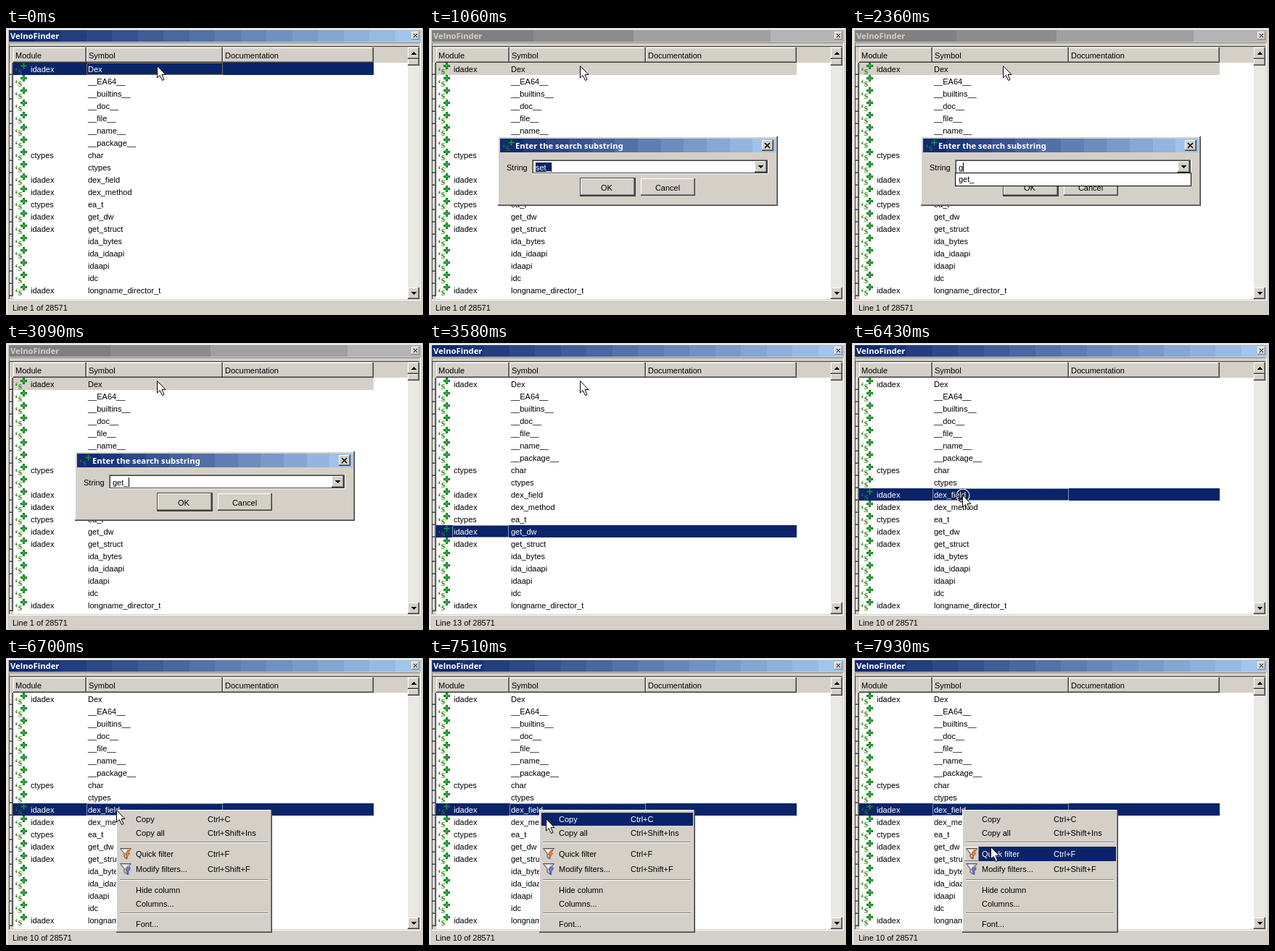
Animation, 575 px wide and 397 px high, one loop 7.99 s. Source, as an HTML page:

```html
<!DOCTYPE html>
<html lang="en">
<head>
<meta charset="utf-8">
<style>
  html, body { margin: 0; width: 100%; height: 100%; overflow: hidden; background: #d4d0c8; }
  svg { display: block; width: 575px; height: 397px; shape-rendering: crispEdges; }
  text { font: 11px "Liberation Sans", Arial, sans-serif; white-space: pre; }
  .title { font: bold 11.25px "Noto Sans", sans-serif; }
  .quote { font: bold 14px "Liberation Serif", serif; }
  .ring { fill: none; stroke: #fff; stroke-width: 1.3; mix-blend-mode: difference; }
  .smooth { shape-rendering: auto; }
</style>
</head>
<body>
<svg id="stage" viewBox="0 0 575 397"></svg>
<script>
const LOOP = 7990, STEP = 60;
const FACE = '#d4d0c8', NAVY = '#0a246a', SHADOW = '#808080', DARK = '#404040';
const ROW_TOP = 49, ROW_H = 17;
const stage = document.getElementById('stage');

const ROWS = [
  'idadex Dex', ' __EA64__', ' __builtins__', ' __doc__', ' __file__', ' __name__', ' __package__',
  'ctypes char', ' ctypes', 'idadex dex_field', 'idadex dex_method', 'ctypes ea_t', 'idadex get_dw',
  'idadex get_struct', ' ida_bytes', ' ida_idaapi', ' idaapi', ' idc', 'idadex longname_director_t',
].map(row => row.split(' '));

// label, shortcut, baseline, highlight left, top, height
const MENU = [
  ['Copy', 'Ctrl+C', 227, 155, 214, 18],
  ['Copy all', 'Ctrl+Shift+Ins', 246, 155, 233, 18],
  ['Quick filter', 'Ctrl+F', 275, 175, 261, 20],
  ['Modify filters...', 'Ctrl+Shift+F', 296, 175, 282, 20],
  ['Hide column', '', 325], ['Columns...', '', 344], ['Font...', '', 372],
];

const rect = (x, y, w, h, fill, extra = '') =>
  `<rect x="${x}" y="${y}" width="${w}" height="${h}" fill="${fill}" ${extra}/>`;
const path = (d, fill, extra = '') => `<path d="${d}" fill="${fill}" ${extra}/>`;
const text = (x, y, str, fill = '#000', extra = '') =>
  `<text x="${x}" y="${y}" fill="${fill}" ${extra}>${str}</text>`;

function bevel(x, y, w, h, light = '#fff', dark = SHADOW, fill = FACE) {
  return rect(x, y, w, h, dark) + rect(x, y, w - 1, h - 1, light) + rect(x + 1, y + 1, w - 2, h - 2, fill);
}
const button = (x, y, w, h) => rect(x, y, w, h, DARK) + bevel(x, y, w - 1, h - 1);
const arrow = (x, y, dir) => path(`M${x - 4} ${y}h8l-4 ${4 * dir}z`, '#000');

function bands(x, y, w, h, count) {
  const from = [10, 36, 106], to = [166, 202, 240];
  let out = '';
  for (let i = 0; i < count; i++) {
    const rgb = from.map((c, k) => Math.round(c + (to[k] - c) * (i + 0.5) / count));
    const left = Math.round(x + w * i / count);
    out += rect(left, y, x + w - left, h, `rgb(${rgb})`);
  }
  return out;
}

function symbolIcon(x, y, dimmed) {
  return `<g transform="translate(${x} ${y})" opacity="${dimmed ? 0.6 : 1}">` +
    text(0, 16, '‘s', '#3c8c1e', 'class="quote"') +
    path('M11 0h3v3h3v3h-3v3h-3v-3h-3v-3h3z', '#0a6e14') +
    path('M12 1h1v3h3v1h-3v3h-1v-3h-3v-1h3z', '#32d24b') + '</g>';
}

function funnel(y, badge) {
  return `<g class="smooth" transform="translate(157 ${y})">` +
    path('M.5 .5h15l-5.5 7v7.5l-4-2.5v-5z', '#c4c4c4', 'stroke="#505050"') +
    path('M3 2h8l-4 5z', '#f2f2f2') + badge + '</g>';
}

function mainTitle(active) {
  const grays = [[4, '#808080'], [144, '#8c8c8c'], [282, '#a0a0a0'], [471, '#b4b4b4']];
  const bar = active ? bands(4, 3, 568, 16, 16)
    : grays.map(([x, fill]) => rect(x, 3, 572 - x, 16, fill)).join('');
  return bar + text(6, 15, 'VelnoFinder', active ? '#fff' : FACE, 'class="title"') +
    bevel(559, 5, 11, 11) + path('M562 8l5 5m0-5l-5 5', 'none', 'stroke="#000" class="smooth"');
}

function table(selected, focusColumn, active) {
  let out = bevel(4, 20, 568, 357, SHADOW, '#fff') + bevel(4, 25, 567, 351, DARK, FACE, '#fff') +
    rect(5, 26, 565, 22, FACE) + rect(5, 26, 5, 350, FACE);
  [[10, 101, 'Module'], [111, 188, 'Symbol'], [299, 208, 'Documentation']].forEach(([x, w, label]) => {
    out += button(x, 27, w, 21) + text(x + 3, 42, label);
  });
  ROWS.forEach(([module, symbol], i) => {
    const y = ROW_TOP + i * ROW_H, chosen = i === selected;
    const ink = chosen && active ? '#fff' : '#000';
    if (chosen) {
      out += rect(10, y - 1, 497, ROW_H, active ? NAVY : FACE);
      if (active) {
        const [x, w, color] = focusColumn ? [111, 188, i ? '#fff' : '#f5c04a'] : [32, 78, '#fff'];
        out += rect(x + .5, y - .5, w - 1, ROW_H - 1, 'none', `stroke="${color}" stroke-dasharray="1 1"`);
      }
    }
    out += button(5, y - 1, 5, ROW_H) + symbolIcon(12, y - 1, chosen && active) +
      text(34, y + 12, module, ink) + text(113, y + 12, symbol, ink);
  });
  return out + rect(554, 27, 16, 348, '#eae8e4') +
    button(554, 27, 16, 16) + arrow(562, 37, -1) +
    button(554, 43, 16, 9) +
    button(554, 359, 16, 16) + arrow(562, 365, 1);
}

function dialog(t) {
  const typed = 'get_'.slice(0, Math.floor((t - 2360) / 120) + 1);
  const editing = t >= 2360;
  const caretX = editing ? [153, 159, 162, 169][typed.length - 1] : 168;
  const caretOn = t < 1620 || t >= 2120;
  let out = button(95, 150, 386, 96) + bands(98, 153, 380, 19, 12) + symbolIcon(101, 154, true) +
    text(119, 167, 'Enter the search substring', '#fff', 'class="title"') +
    button(459, 155, 16, 15) + path('M463 159l7 7m0-7l-7 7', 'none', 'stroke="#000" stroke-width="1.6" class="smooth"') +
    text(107, 197, 'String') +
    bevel(142, 182, 326, 20, SHADOW, '#fff', '#fff') + rect(143.5, 183.5, 323, 17, 'none', `stroke="${DARK}"`) +
    button(449, 184, 17, 16) + arrow(457, 190, 1) +
    rect(208, 207, 77, 26, DARK) + button(209, 208, 75, 24) + text(245, 225, 'OK', '#000', 'text-anchor="middle"') +
    button(292, 208, 75, 24) + text(329, 225, 'Cancel', '#000', 'text-anchor="middle"');
  out += editing ? text(147, 197, typed) : rect(147, 186, 21, 13, NAVY) + text(147, 197, 'set_', '#fff');
  if (caretOn) out += rect(caretX, 186, 1, 13, '#000');
  if (editing && t < 3090) {
    out += rect(142.5, 200.5, 325, 18, '#fff', 'stroke="#000"') + text(147, 213, 'get_');
  }
  return out;
}

function menu(hovered) {
  let out = button(152, 210, 215, 170);
  for (const y of [254, 306, 352]) out += rect(157, y, 204, 1, SHADOW) + rect(157, y + 1, 204, 1, '#fff');
  MENU.forEach(([label, shortcut, base, left, top, h], i) => {
    const on = i === hovered, ink = on ? '#fff' : '#000';
    if (on) {
      out += rect(left, top, 364 - left, h, NAVY);
      if (left > 155) out += bevel(155, top, 20, h);
    }
    out += text(179, base, label, ink) + text(278, base, shortcut, ink);
  });
  return out + funnel(263, path('M11 3l-4 6h3l-2 6 6-8h-3l3-4z', '#f58a1e', 'stroke="#c03c10" stroke-width=".6"')) +
    funnel(284, path('M10 5l2 2 2-2v4l-2 1.5v5h-2v-5l-2-1.5z', '#6e78d8', 'stroke="#3c4696" stroke-width=".6"'));
}

// Pointer moves advance in 60 ms steps.
const progress = (t, start, count) => Math.max(0, Math.min(1, (Math.floor((t - start) / STEP) + 1) / count));

function pointerAt(t) {
  const a = (1 - Math.cos(Math.PI * progress(t, 5570, 7))) / 2;
  const b = 1 - (1 - progress(t, 7510, 8)) ** 2;
  return [208 - 56 * a + 39 * b, 52 + 158 * a + 51 * b].map(Math.round);
}

const pointer = (x, y) => path('M.5 .5v16.5l3.7-3.5 3.3 7 2.5-1.1-3-6.9h5z', '#fff',
  `stroke="#000" class="smooth" transform="translate(${x} ${y})"`);

function draw(t) {
  const [x, y] = pointerAt(t);
  const active = t < 1060 || t >= 3580;
  const selected = t < 3580 ? 0 : t < 6430 ? 12 : 9;
  let out = rect(0, 0, 575, 397, FACE) + rect(1, 1, 573, 1, '#fff') + rect(1, 1, 1, 395, '#fff') +
    mainTitle(active) + table(selected, selected !== 12, active) +
    text(9, 391, `Line ${selected + 1} of 28571`);
  if (!active) out += dialog(t);
  if (t >= 6700) out += menu(t < 7510 ? -1 : y <= 232 ? 0 : y < 256 ? 1 : 2);
  if (t >= 6430 && t < 6550) out += '<circle class="ring smooth" cx="153" cy="211" r="9"/>';
  return out + pointer(x, y);
}

let shown = '';
function tick(now) {
  const markup = draw(now % LOOP);
  if (markup !== shown) stage.innerHTML = shown = markup;
  requestAnimationFrame(tick);
}
tick(performance.now());
</script>
</body>
</html>
```
